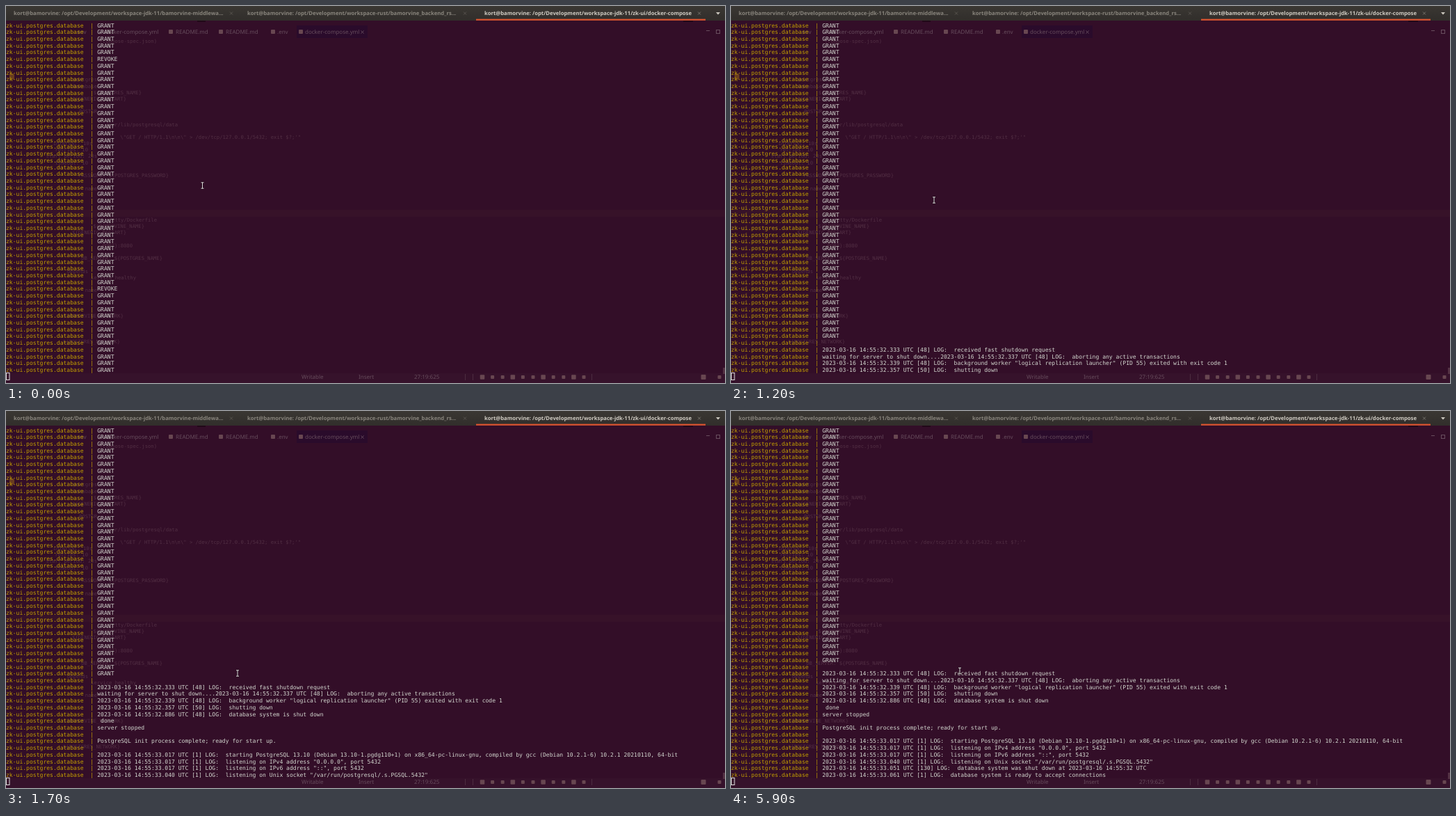
Animation, 1034 px wide and 542 px high, one loop 8000 ms. Source, as an HTML page:

```html
<!DOCTYPE html>
<html lang="en">
<head>
<meta charset="utf-8">
<title>Terminal log</title>
<style>
  html, body { margin: 0; width: 100%; height: 100%; overflow: hidden; background: #330e28; }
  svg { display: block; width: 1034px; height: 542px; }
  text { white-space: pre; text-rendering: geometricPrecision; }
  .term { font: 8.075px "DejaVu Sans Mono", monospace; }
  .prefix { fill: #c4a000; }
  .message { fill: #d3d7cf; }
  .tab { font: bold 7.7px "Noto Sans", sans-serif; fill: #89857d; }
  .tab.active { fill: #d0ccc3; }
  .code { font: 7.2px "DejaVu Sans Mono", monospace; fill: #522f44; text-anchor: end; }
  .ide { font: 8px "Noto Sans", sans-serif; fill: #674d5d; }
</style>
</head>
<body>
<svg viewBox="0 0 1034 542">
  <defs>
    <linearGradient id="bar" x2="0" y2="1">
      <stop stop-color="#3a3733"/>
      <stop offset="1" stop-color="#312e2b"/>
    </linearGradient>
  </defs>
  <rect width="1034" height="542" fill="#330e28"/>
  <rect y="293" width="1034" height="10" fill="#371229"/>
  <rect y="528" width="1034" height="14" fill="#36122b"/>
  <rect x="418" y="28" width="102" height="18" fill="#2a0b2b"/>
  <g id="backdrop"></g>
  <rect x="5" y="97" width="7" height="9" rx="2" fill="#693c20"/>
  <g id="icons" fill="#684751"></g>
  <g fill="none" stroke="#684e5e">
    <path d="M510.5 35.5l4 4m0-4l-4 4M1007 35.5h5"/>
    <rect x="1021.5" y="34.5" width="5" height="5"/>
  </g>
  <path d="M660.5 529v9M671.5 529v9M842.5 529v9" stroke="#4c2c40"/>
  <rect x="1031" y="520" width="3" height="9" fill="#533143"/>

  <rect width="1034" height="21" fill="url(#bar)"/>
  <path d="M275 22h12M974 22h14" stroke="#220819" stroke-width="2"/>
  <rect x="676" y="18.6" width="330" height="2.2" fill="#dc5330"/>
  <g id="tabs"></g>
  <path d="M1021 9h6l-3 3.4z" fill="#cbc7be"/>

  <g id="rows"></g>
  <rect x=".5" y="527.5" width="4.5" height="10" fill="none" stroke="#dedede"/>
  <g id="pointer" fill="none">
    <path d="M-2.3-4.2H2.3M0-4.2V4.2M-2.3 4.2H2.3" stroke="#210819" stroke-width="2.4"/>
    <path d="M-2-4.2H2M0-4.2V4.2M-2 4.2H2" stroke="#dedbdc"/>
  </g>
</svg>
<script>
const LOOP = 8000, ROWS = 52, PITCH = 9.716, CELL = 4.862, BASELINE = 30.5;
const byId = id => document.getElementById(id);

function add(parent, tag, attrs, content = "") {
  const node = document.createElementNS("http://www.w3.org/2000/svg", tag);
  for (const key in attrs) node.setAttribute(key, attrs[key]);
  node.textContent = content;
  return parent.appendChild(node);
}

// Editor showing faintly through the terminal: [right edge, centre y, text]
const code = [
  [217, 50, "(compose-spec.json)"], [131, 105, "postgres"], [131, 115, "Database"],
  [195, 124, "${POSTGRES_NAME}"], [173, 133, "${GENERIC_RESTART}"], [131, 151, "- POSTGR"],
  [247, 170, "/var/lib/postgresql/data"],
  [424, 188, "\\\"GET / HTTP/1.1\\n\\n\\\" > /dev/tcp/127.0.0.1/5432; exit $?;'\""],
  [124, 197, "interval: 10s"], [118, 206, "retries: 10"], [131, 215, "start_period: 20s"],
  [118, 225, "timeout: 10"], [234, 243, "PASSWORD: ${POSTGRES_PASSWORD}"], [131, 262, "name"],
  [217, 307, "jetty/Dockerfile"], [199, 316, "${BAMORVINE_NAME}"], [173, 325, "${GENERIC_RESTART}"],
  [182, 344, "PORT}:8080"], [225, 362, "DB_SERVER: ${POSTGRES_NAME}"], [118, 381, "depends"],
  [187, 390, "service_healthy"], [131, 408, "name"], [169, 445, "${BAMORVINE_NETWORK}"],
  [164, 482, "${POSTGRES_NETWORK}"]
];
const ideLabels = [
  [100, 40, ".env"], [141, 40, "docker-compose.yml"], [244, 40, "README.md"], [316, 40, "README.md"],
  [390, 40, ".env"], [430, 40, "docker-compose.yml"],
  [425, 536, "Writable"], [507, 536, "Insert"], [587, 536, "27:19:625"]
];
const backdrop = byId("backdrop");
for (const [x, y, s] of code) add(backdrop, "text", { class: "code", x, y: y + 2.6 }, s);
for (const [x, y, s] of ideLabels) add(backdrop, "text", { class: "ide", x, y }, s);

const icons = byId("icons");
const icon = (x, y, size) => add(icons, "rect", { x: x - size / 2, y: y - size / 2, width: size, height: size, rx: 1 });
for (let i = 0; i < 11; i++) icon(685 + i * 14.6, 533.5, i % 3 ? 5 : 6.5);
icon(1003, 533.5, 7);
icon(1026, 533.5, 5);
for (const x of [237, 309, 384, 424]) icon(x, 37, 6);

const home = "kort@bamorvine: /opt/Development/workspace-";
const tabs = [
  [11, 324, "jdk-11/bamorvine-middlewa..."],
  [347, 660, "rust/bamorvine_backend_rs..."],
  [688, 997, "jdk-11/zk-ui/docker-compose"]
];
tabs.forEach(([x, close, path], i) => {
  const active = i === 2;
  add(byId("tabs"), "text", { class: active ? "tab active" : "tab", x, y: 13 }, home + path);
  add(byId("tabs"), "path", {
    d: `M${close - 2} 8.5l4 4m0-4l-4 4`, stroke: active ? "#77736c" : "#59554f", fill: "none"
  });
});

// Database log
const LOG_START = 127, REVOKES = [5, 39, 73];
const log = (time, pid, message) => `2023-03-16 14:55:${time} UTC [${pid}] LOG:  ${message}`;
const tail = [
  "",
  log("32.333", 48, "received fast shutdown request"),
  "waiting for server to shut down...." + log("32.337", 48, "aborting any active transactions"),
  log("32.339", 48, 'background worker "logical replication launcher" (PID 55) exited with exit code 1'),
  log("32.357", 50, "shutting down"),
  log("32.886", 48, "database system is shut down"),
  " done",
  "server stopped",
  "",
  "PostgreSQL init process complete; ready for start up.",
  "",
  log("33.017", 1, "starting PostgreSQL 13.10 (Debian 13.10-1.pgdg110+1) on x86_64-pc-linux-gnu, compiled by gcc (Debian 10.2.1-6) 10.2.1 20210110, 64-bit"),
  log("33.017", 1, 'listening on IPv4 address "0.0.0.0", port 5432'),
  log("33.017", 1, 'listening on IPv6 address "::", port 5432'),
  log("33.040", 1, 'listening on Unix socket "/var/run/postgresql/.s.PGSQL.5432"'),
  log("33.051", 130, "database system was shut down at 2023-03-16 14:55:32 UTC"),
  log("33.061", 1, "database system is ready to accept connections")
];
const lineAt = n => n >= LOG_START ? tail[n - LOG_START] : REVOKES.includes(n) ? "REVOKE" : "GRANT";

const messages = Array.from({ length: ROWS }, (_, i) => {
  const y = BASELINE + i * PITCH;
  add(byId("rows"), "text", { class: "term prefix", x: 0, y }, "zk-ui.postgres.database  |");
  return add(byId("rows"), "text", { class: "term message", x: 27 * CELL, y });
});

// Held states: [start ms, value...]
const scroll = [
  [0, 0], [100, 8], [200, 16], [300, 23], [400, 31], [500, 40], [600, 47], [700, 55],
  [800, 63], [900, 71], [1100, 80], [1500, 81], [1700, 90], [2000, 92]
];
const pointer = [
  [0, 282.5, 258], [1200, 292, 279], [1300, 312, 327], [1400, 328, 366], [1500, 333, 377],
  [2000, 333, 374], [5800, 331, 373.5], [5900, 329, 373.5]
];
const stateAt = (track, t) => track.findLast(([start]) => start <= t);

let shownTop = -1;
function draw(t) {
  const [, top] = stateAt(scroll, t);
  const [, x, y] = stateAt(pointer, t);
  if (top !== shownTop) messages.forEach((node, i) => node.textContent = lineAt(top + i));
  shownTop = top;
  byId("pointer").setAttribute("transform", `translate(${x} ${y})`);
}

const begin = performance.now();
function tick() {
  draw((performance.now() - begin) % LOOP);
  requestAnimationFrame(tick);
}
tick();
</script>
</body>
</html>
```
